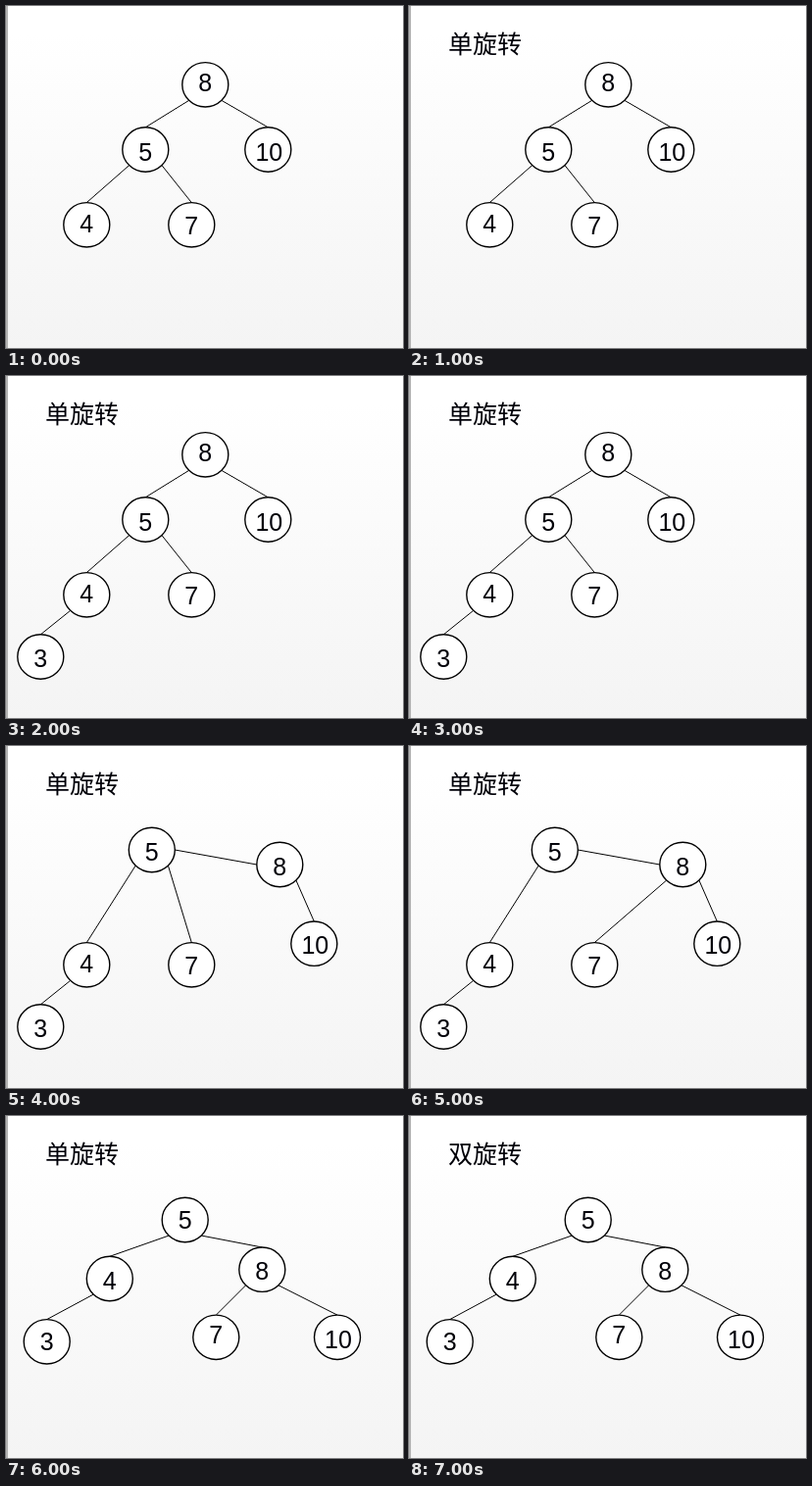
These frames come from a looping animation (405 px wide and 349 px high, 8000 ms). An HTML page:

```html
<!DOCTYPE html>
<html lang="zh-CN">
<head>
<meta charset="utf-8">
<title>树的旋转</title>
<style>
html, body { margin: 0; width: 100%; height: 100%; overflow: hidden; background: #fff; }
svg { display: block; width: 405px; height: 349px; }
.title { font: 25px "Noto Sans CJK SC", "Noto Sans CJK", sans-serif; fill: #000008; }
.num { font: 25px "Liberation Sans", Arial, sans-serif; fill: #000008; text-anchor: middle; }
ellipse { fill: #fff; stroke: #000; stroke-width: 1.4; }
line { stroke: #000; stroke-width: 1; }

.show { visibility: hidden; animation: 8s step-end infinite; }
#single { animation-name: single; }
#double { animation-name: double; }
#start { animation-name: start; }
#added { animation-name: added; }
#turned { animation-name: turned; }
#before { animation-name: before; }
#after { animation-name: after; }
#tidy { animation-name: tidy; }
@keyframes single { 0%, 87.5% { visibility: hidden } 12.5% { visibility: visible } 100% { visibility: hidden } }
@keyframes double { 0% { visibility: hidden } 87.5%, 100% { visibility: visible } }
@keyframes start { 0% { visibility: visible } 50%, 100% { visibility: hidden } }
@keyframes added { 0%, 75%, 100% { visibility: hidden } 25% { visibility: visible } }
@keyframes turned { 0%, 75%, 100% { visibility: hidden } 50% { visibility: visible } }
@keyframes before { 0%, 62.5%, 100% { visibility: hidden } 50% { visibility: visible } }
@keyframes after { 0%, 75%, 100% { visibility: hidden } 62.5% { visibility: visible } }
@keyframes tidy { 0% { visibility: hidden } 75%, 100% { visibility: visible } }
</style>
</head>
<body>
<svg viewBox="0 0 405 349">
  <defs>
    <linearGradient id="sky" x2="0" y2="1">
      <stop offset=".08" stop-color="#fff"/>
      <stop offset="1" stop-color="#f4f4f4"/>
    </linearGradient>
  </defs>
  <rect width="405" height="349" fill="url(#sky)"/>
  <rect width="2" height="349" fill="#b4b4b4"/>
  <text id="single" class="title show" x="40" y="47.5">单旋转</text>
  <text id="double" class="title show" x="40" y="47.5">双旋转</text>
  <g id="start" class="show"></g>
  <g id="added" class="show"></g>
  <g id="turned" class="show"></g>
  <g id="before" class="show"></g>
  <g id="after" class="show"></g>
  <g id="tidy" class="show"></g>
</svg>
<script>
const RX = 23.5, RY = 22.7;

// A node is [value, x, y, baseline].
const node = ([value, x, y, base]) =>
  `<ellipse cx="${x}" cy="${y}" rx="${RX}" ry="${RY}"/>` +
  `<text class="num" x="${x + (value > 9 ? 1 : 0)}" y="${base}">${value}</text>`;

const line = (x1, y1, x2, y2) => `<line x1="${x1}" y1="${y1}" x2="${x2}" y2="${y2}"/>`;

// Runs from a lower corner of the parent to the top of the child.
const edge = ([, px, py], [, cx, cy]) =>
  line(px + Math.sign(cx - px) * RX * Math.SQRT1_2, py + RY * Math.SQRT1_2, cx, cy - RY);

function draw(id, nodes, edges = [], extra = "") {
  document.getElementById(id).innerHTML =
    edges.map(e => edge(...e)).join("") + extra + nodes.map(node).join("");
}

const n3 = [3, 35.3, 286.5, 297], n4 = [4, 82.3, 223.3, 230.5], n7 = [7, 189.3, 223.3, 232.5];

const a8 = [8, 203.3, 80.3, 87], a5 = [5, 142.3, 146.5, 157.5], a10 = [10, 267.3, 146.5, 157.5];
draw("start", [a8, a5, a10, n4, n7], [[a8, a5], [a8, a10], [a5, n4], [a5, n7]]);
draw("added", [n3], [[n4, n3]]);

const b5 = [5, 148.8, 106, 116.5], b8 = [8, 279.3, 121, 131.5], b10 = [10, 314.3, 201.7, 212];
draw("turned", [b5, b8, b10, n4, n7], [[b5, n4], [b8, b10]],
  line(b5[1] + RX, b5[2], b8[1] - RX, b8[2]));
draw("before", [], [[b5, n7]]);
draw("after", [], [[b8, n7]]);

const c5 = [5, 182.7, 106, 115], c4 = [4, 105.8, 166, 177], c8 = [8, 261.3, 156.7, 167];
const c3 = [3, 41.7, 230.3, 239], c7 = [7, 214.3, 225.8, 232], c10 = [10, 338, 225.8, 237];
draw("tidy", [c5, c4, c8, c3, c7, c10],
  [[c5, c4], [c5, c8], [c4, c3], [c8, c7], [c8, c10]]);
</script>
</body>
</html>
```
